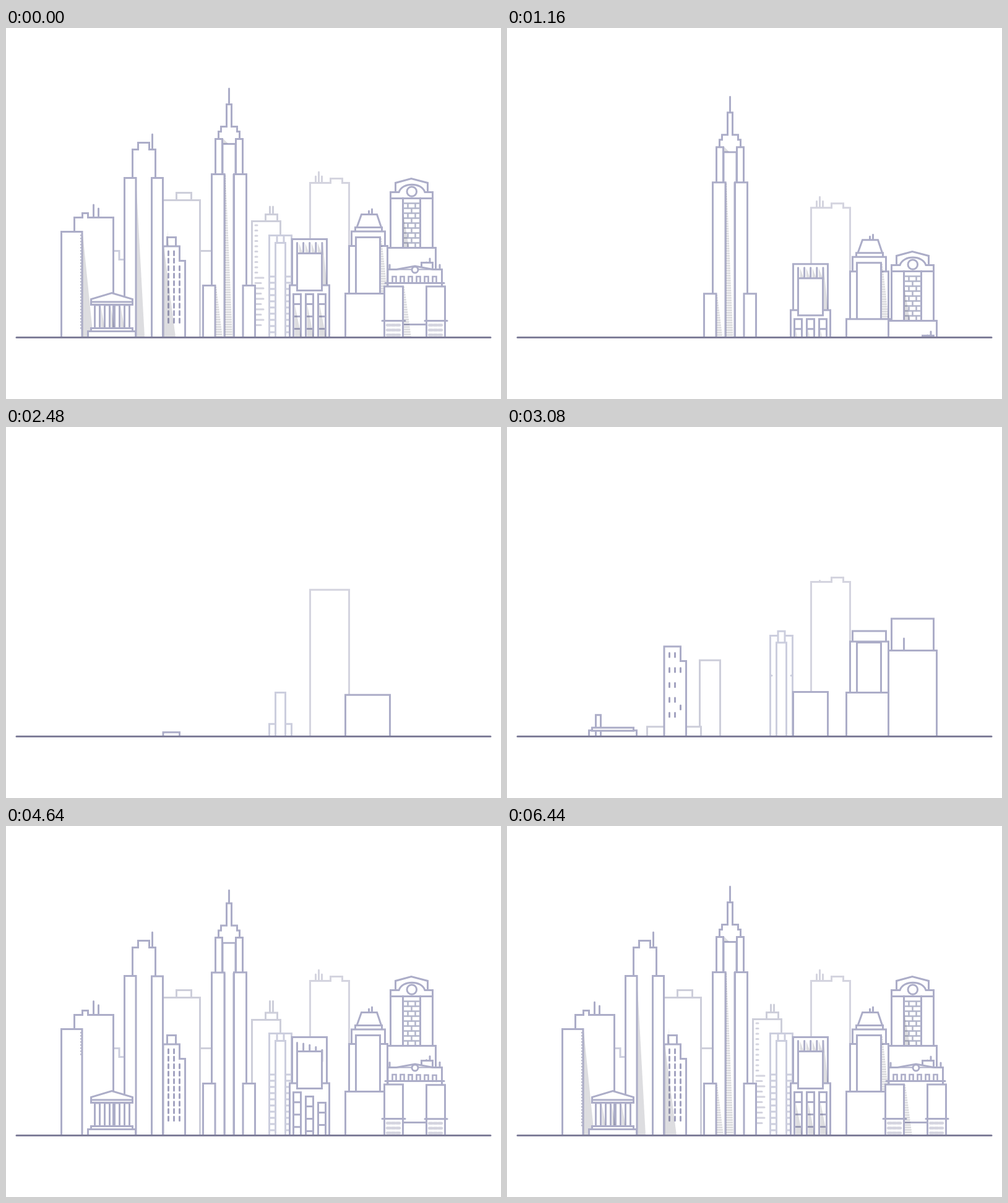
An HTML page with a canvas for the animation above (9120 ms loop, 800 px wide and 600 px high).

```html
<!DOCTYPE html>
<html lang="en">
<head>
<meta charset="utf-8">
<title>Skyline</title>
<style>
html, body { margin: 0; width: 100%; height: 100%; overflow: hidden; background: #fff; }
canvas { display: block; }
</style>
</head>
<body>
<canvas id="stage" width="800" height="600"></canvas>
<script>
const ctx = document.getElementById('stage').getContext('2d');
const LOOP = 9120, EMPTY = 1640, BUILD = 2100, TAU = 140, GROUND = 500;
const MAIN = '#acadc8', PALE = '#cdceda', FAINT = '#d4d4df', BLUE = '#cccede';
let t = 0;

// Share of the way still to go; a positive spring overshoots.
function left(t0, spring) {
  if (t < BUILD) return 0;
  if (!spring) return Math.exp((t0 - t) / TAU);
  const q = Math.min(1, (t - t0) / 560) - 1;
  return -(spring + 1) * q ** 3 - spring * q * q;
}

const shown = t0 => t < BUILD || t >= t0;

function part(t0, travel, d, color = MAIN, spring = 0, width = 3) {
  if (!shown(t0)) return;
  const dy = travel * left(t0, spring);
  const path = new Path2D(d);
  ctx.save();
  ctx.translate(0, Math.abs(dy) < 0.3 ? 0 : dy);
  ctx.fillStyle = '#fff';
  ctx.strokeStyle = color;
  ctx.lineWidth = width;
  ctx.fill(path);
  ctx.stroke(path);
  ctx.restore();
}

function box(t0, x, y, x2, color, spring, base = 510) {
  part(t0, Math.min(base, GROUND) - y, `M${x} ${base}V${y}H${x2}V${base}`, color, spring);
}

function rect(t0, travel, x, y, x2, y2, color, spring) {
  part(t0, travel, `M${x} ${y}H${x2}V${y2}H${x}Z`, color, spring);
}

// A mast reaches below its roof so that it stays joined when it overshoots.
function mast(t0, x, y, h, color, spring = 1.7) {
  part(t0, h, `M${x} ${y}V${y + h + 14}`, color, spring);
}

function shade(t0, x, y, y2, w, striped) {
  if (!shown(t0)) return;
  const k = w * (1 - left(t0));
  ctx.fillStyle = 'rgba(85,85,100,.2)';
  if (!striped) {
    ctx.beginPath();
    ctx.moveTo(x, y);
    ctx.lineTo(x + k, y2);
    ctx.lineTo(x, y2);
    ctx.fill();
    return;
  }
  for (let r = y; r < y2; r += 4) ctx.fillRect(x, r, k * (r - y) / (y2 - y) + 1, 3);
}

function group(end, height, draw) {
  const dy = t < BUILD ? height * Math.exp((t - end) / TAU) : 0;
  if (dy > height + 20) return;
  ctx.save();
  ctx.translate(0, dy < 0.8 ? 0 : dy);
  draw();
  ctx.restore();
}

function paleTower() {
  mast(3110, 500.5, 240, 10, FAINT);
  mast(3070, 505.5, 233, 17, FAINT);
  mast(3150, 510.5, 240, 10, FAINT);
  box(2066, 491.5, 250.5, 554.5, FAINT);
  if (shown(2560)) part(2560, 7, 'M524.5 250.5V243.5H543.5V250.5', FAINT);
  if (shown(2560)) { ctx.fillStyle = '#fff'; ctx.fillRect(526, 247, 16, 6); }
}

function backBlock() {
  box(2792, 311.5, 359.5, 344.5, PALE);
  box(3440, 275.5, 265.5, 299.5, PALE, 0, 284);
  box(3071, 226.5, 277.5, 313.5, PALE);
}

function slimBlock() {
  part(3739, 141, 'M165 510V359.5H183V373.5H200V510', BLUE);
}

function leftBlock() {
  mast(4250, 141.5, 285, 20);
  mast(4290, 149.5, 291, 14);
  part(3473, 195, 'M110.5 510V305.5H123.5V298.5H132.5V305.5H173.5V510');
  box(3465, 89.5, 328.5, 123);
  for (let i = 0; i < 31; i++) {
    if (!shown(4500 + i * 20)) continue;
    ctx.fillStyle = '#b5b6cb';
    ctx.fillRect(120, 333 + i * 5, 3, 2.5);
  }
  shade(5000, 124, 332, 500, 17);
}

function twinTower() {
  mast(3950, 236.5, 172, 25);
  part(3572, 303, 'M204.5 510V196.5H213.5V185.5H231.5V196.5H241.5V510');
  shade(5160, 210, 244, 500, 14);
  box(3668, 191.5, 242.5, 210);
  box(3789, 235.5, 242.5, 253.5);
}

function officeBlock() {
  box(3290, 260.5, 338.5, 274.5, MAIN, 0, 360);
  part(2475, 147, 'M254 510V353H280.5V376.5H289.5V510');
  for (let c = 0; c < 3; c++) for (let i = c > 1 ? 2 : 0; i < 10; i++) {
    const late = c > 1 ? i % 5 != 2 : i % 2;
    const x = 262.5 + c * 9, y = 361 + i * 12.1;
    part(late ? 3150 + i * 30 : 3000, 8, `M${x} ${y}v6.5`, '#a2a2c0');
  }
  shade(5350, 255, 352, 500, 19);
  shade(5350, 261, 326, 352, 2);
}

function spireTower() {
  mast(4440, 360.5, 98, 25, MAIN, 0);
  part(3857, 402, 'M353 510V236L343.5 180V167.5H347.5V159.5H356.5V123.5H364.5V159.5H373.5V167.5H377.5V180L368 236V510');
  if (shown(3857)) {
    part(3857, 402, 'M350 236V187.5H371V236');
    ctx.save();
    ctx.translate(0, 402 * left(3857));
    ctx.fillStyle = '#fff';
    ctx.fillRect(345, 179, 31, 7);
    ctx.restore();
  }
  shade(5420, 351, 179, 187, 8);
  box(3823, 338.5, 179.5, 349.5);
  box(3840, 371.5, 179.5, 382.5);
  box(3772, 332.5, 236.5, 353);
  box(3699, 368.5, 236.5, 388.5);
  shade(5220, 354, 238, 500, 11, true);
  box(3848, 318.5, 416.5, 338);
  shade(5520, 339, 418, 500, 10, true);
  box(3688, 383, 416.5, 402.5);
}

function dashedBlock() {
  mast(4390, 426.5, 289, 11, PALE, 5);
  mast(4390, 431.5, 289, 11, PALE, 5);
  box(4150, 419.5, 301.5, 438.5, PALE, 0, 320);
  box(3907, 397.5, 312.5, 443.5, PALE);
  for (let i = 0; i < 20; i++) {
    const y = 319 + i * 8.5;
    if (y < 482 && shown(4900 + i * 50)) part(4900 + i * 50, 0, `M403 ${y}h${y < 400 ? 3 : i % 2 ? 9 : 13}`, FAINT);
  }
}

function ladderTower() {
  box(2463, 425.5, 335.5, 461.5, BLUE);
  for (let i = 0; i < 10; i++) {
    const y = 402 + i * 10;
    if (!shown(3050 + i * 35)) continue;
    const w = 10 * (1 - left(3050 + i * 35));
    part(0, 0, `M426 ${y}h${w}M461 ${y}h${-w}`, BLUE);
  }
  part(2830, 12, 'M438 360V335.5H449V360', BLUE, 4.5);
  box(2394, 435.5, 347.5, 451.5, BLUE);
}

function windowBlock() {
  box(2997, 462.5, 341.5, 518.5);
  shade(5300, 512, 350, 416, 7);
  for (let i = 0; i < 5; i++) {
    const x = 470.5 + i * 10.1;
    part(4400 + i * 55, 17, `M${x} 347.5V366`);
    if (i) shade(5650 + i * 40, x - 7, 348, 364, 6);
  }
  box(3437, 458.5, 416, 522.5);
  rect(3480, 45, 470.5, 364.5, 510.5, 424.5, MAIN, 1.2);
  [3907, 4318, 4442].forEach((t0, i) => {
    const x = 464.5 + i * 20;
    part(t0, 70, `M${x} 510V430.5h12V510M${x} 446.5h12M${x} 466.5h12M${x} 486.5h12`);
    shade(5500 + i * 120, x + 2, 446, 500, 11);
  });
}

function cappedTower() {
  mast(3420, 586.5, 296, 6);
  mast(3380, 591.5, 293, 9);
  part(3250, 21, 'M567 322.5L574.5 301.5H599.5L606.5 322.5');
  box(3180, 564.5, 322.5, 607.5, MAIN, 0, 332);
  box(2600, 558.5, 329, 612.5, MAIN, 0, 360);
  box(2830, 554.5, 352.5, 616.5, MAIN, 1.5);
  box(2690, 565.5, 338.5, 604.5);
  shade(5600, 606, 340, 430, 10, true);
  box(2066, 548.5, 429.5, 620.5);
}

function archTower() {
  part(3200, 32, 'M629.5 276V250.5L655 243.5L681.5 250.5V276');
  part(3250, 20, 'M621.5 276V265.5H635C640 249 672 249 677 265.5H689.5V276');
  part(3300, 12, 'M648 264.5a7.8 7.8 0 1 0 15.6 0a7.8 7.8 0 1 0 -15.6 0');
  box(2948, 621.5, 275.5, 689.5, MAIN, 0, 365);
  part(3056, 80, 'M641.5 275V356');
  part(3120, 80, 'M669.5 275V356');
  for (let i = 0; i < 9; i++) {
    const y = 283.5 + i * 8;
    part(3200 + i * 35, 6, `M643 ${y}h25` + (i % 2 ? `M655.5 ${y}v8` : `M649.5 ${y}v8M661.5 ${y}v8`), '#b3b6cb', 0, 2.6);
  }
  shade(5700, 642, 300, 354, 9);
  box(2633, 616.5, 355.5, 694.5);
  mast(4220, 679.5, 379, 8);
  mast(4180, 685, 373, 14);
  box(4060, 671.5, 379.5, 689.5, MAIN, 0, 392);
}

function hall() {
  mast(4260, 620, 383, 7);
  mast(4300, 701, 383, 7);
  part(3623, 110, 'M617 510V390.5H631L661 385L690 390.5H704.5V510');
  part(3623, 110, 'M617 390.5H704.5', MAIN, 0, 2);
  part(3720, 22, 'M656 391a5 5 0 1 0 10 0a5 5 0 1 0 -10 0');
  for (let i = 0; i < 6; i++) {
    const x = 624.5 + i * 13;
    part(4080 + i * 45, 11, `M${x} 412V402h6V412`, MAIN, 0, 2.6);
  }
  part(3730, 25, 'M613 412.5H708');
  part(3895, 22, 'M642 479.5H680');
  box(3731, 611.5, 418, 641.5);
  box(3990, 679.5, 418, 709.5);
  part(3895, 27, 'M608 473.5H645');
  part(4040, 27, 'M677 473.5H713');
  [616, 684].forEach((x0, side) => {
    for (let i = 0; i < 9; i++) {
      const x = x0 + i % 3 * 7.5, y = 480.5 + (i / 3 | 0) * 8;
      part(3895 + side * 145, 27, `M${x} ${y}h5`, FAINT, 0, 4.5);
    }
  });
  shade(5580, 643, 418, 500, 11, true);
}

function temple() {
  box(2600, 132.5, 490.5, 209.5);
  for (let i = 0; i < 4; i++) {
    const x = 143.5 + i * 16;
    rect(2974 + i * 210, 38, x, 448, x + 8, 486);
    if (i) shade(5400 + i * 130, x - 6, 450, 485, 6);
  }
  rect(2680, 14, 137.5, 485.5, 204.5, 490.5);
  rect(3850, 52, 137.5, 442.5, 204.5, 447.5);
  part(3828, 72, 'M137.5 443V438.5L171 428.5L204.5 438.5V443Z');
}

function ground() {
  ctx.strokeStyle = '#7f7e99';
  ctx.lineWidth = 3;
  ctx.lineCap = 'round';
  ctx.beginPath();
  ctx.moveTo(17, 500.5);
  ctx.lineTo(783, 500.5);
  ctx.stroke();
}

// Back to front: when it has sunk, its height, how it is drawn.
const city = [
  [1426, 267, paleTower], [780, 235, backBlock], [700, 141, slimBlock],
  [740, 215, leftBlock], [860, 328, twinTower], [800, 174, officeBlock],
  [960, 211, dashedBlock], [1640, 402, spireTower], [1020, 165, ladderTower],
  [1353, 159, windowBlock], [1387, 207, cappedTower], [1270, 257, archTower],
  [1080, 117, hall], [640, 72, temple]
];

function frame(now) {
  t = now % LOOP;
  ctx.fillStyle = '#fff';
  ctx.fillRect(0, 0, 800, 600);
  if (t < EMPTY || t >= BUILD) {
    ctx.save();
    ctx.beginPath();
    ctx.rect(0, 0, 800, GROUND);
    ctx.clip();
    city.forEach(b => group(...b));
    ctx.restore();
  }
  ground();
  requestAnimationFrame(frame);
}
frame(performance.now());
</script>
</body>
</html>
```
